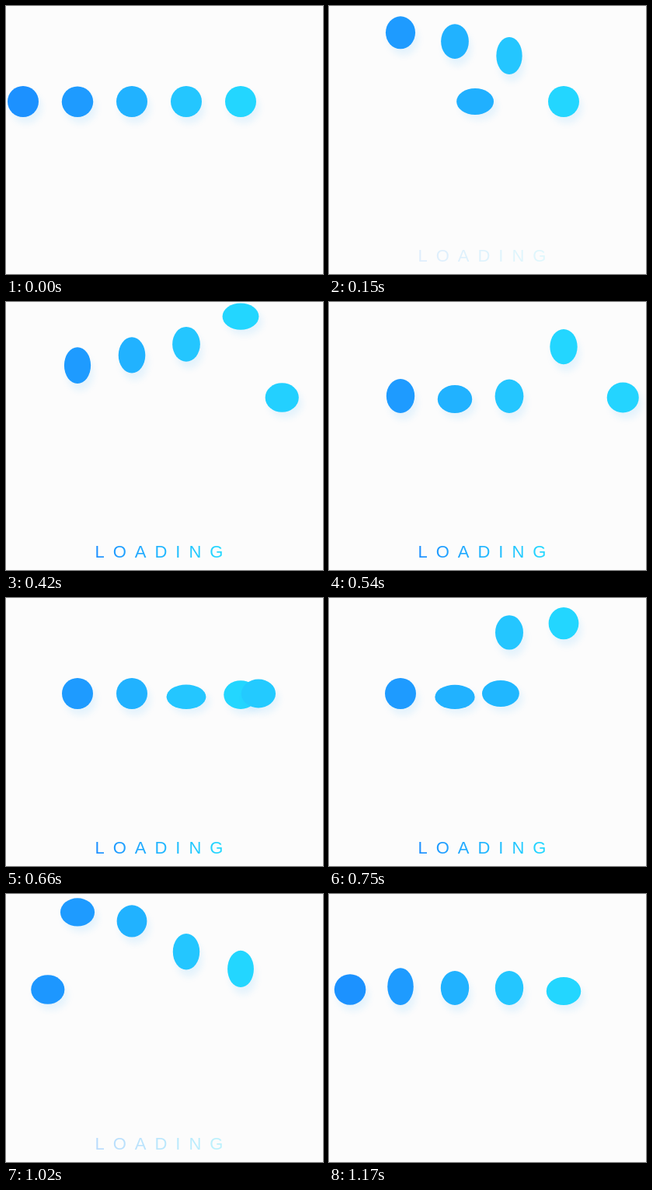
An HTML page for the animation above (1200 ms loop, 408 px wide and 345 px high).

```html
<!DOCTYPE html>
<html lang="en">
<head>
<meta charset="utf-8">
<title>Loading</title>
<style>
  html, body { margin: 0; width: 100%; height: 100%; overflow: hidden; background: #fcfcfc; }
  .ball {
    position: absolute; left: 0; top: 103px; width: 40px; height: 40px;
    border-radius: 50%; transform-origin: 50% 100%;
    box-shadow: 4px 8px 8px rgba(30, 165, 255, .1);
  }
  .slider { transform-origin: 50% 50%; }
  svg { position: absolute; left: 0; top: 0; }
  text { font: 22px "Liberation Sans", Arial, sans-serif; letter-spacing: 11px; }
</style>
</head>
<body>
<svg width="408" height="345">
  <defs>
    <linearGradient id="ink" gradientUnits="userSpaceOnUse" x1="115" y1="0" x2="282" y2="0">
      <stop offset="0" stop-color="#1e90ff"/>
      <stop offset="1" stop-color="#24daff"/>
    </linearGradient>
  </defs>
  <text id="label" x="114.4" y="329" fill="url(#ink)" opacity="0">LOADING</text>
</svg>
<script>
const LOOP = 1200, HALF = 600, HEIGHT = 110, APEX = 0.41;

// Piecewise linear lookup in [[x, y], ...]
function at(table, x) {
  if (x <= table[0][0]) return table[0][1];
  for (let i = 1; i < table.length; i++) {
    const [x0, y0] = table[i - 1], [x1, y1] = table[i];
    if (x <= x1) return y0 + (y1 - y0) * (x - x0) / (x1 - x0);
  }
  return table[table.length - 1][1];
}

const slide = [[0, 0], [.1, .17], [.25, .455], [.35, .615], [.45, .747], [.55, .83],
               [.67, .9], [.8, .956], [.9, .976], [.95, .986], [1, 1]];
const smear = [[0, 0], [.2, 1.05], [1, 0]];
const fade = [[120, 0], [150, .13], [300, 1], [900, 1], [1070, 0]];

// Vertical scale in each phase of a jump
const crouch = [[-60, 1], [-18, .78], [0, .92]];
const rise = [[0, .92], [.2, 1.2], [.3, 1.2], [.55, 1.05], [.73, .9], [.85, .82], [1, .79]];
const fall = [[0, .79], [.27, .9], [.43, 1.02], [.69, 1.15], [1, 1.2]];
const settle = [[0, 1.2], [30, 1.1], [48, .88], [55, .9], [74, 1.1], [84, 1.13],
                [95, 1.1], [125, .9], [160, 1]];

// Lift-off and landing times, out and back
const jumpers = [
  { x: 92,  color: "rgb(30,155,255)", jumps: [[58, 466], [820, 1168]] },
  { x: 162, color: "rgb(33,178,255)", jumps: [[77, 485], [768, 1140]] },
  { x: 232, color: "rgb(36,198,255)", jumps: [[101, 509], [677, 1075]] },
  { x: 302, color: "rgb(35,214,255)", jumps: [[215, 623], [660, 1045]] }
];

function addBall(name) {
  const el = document.createElement("div");
  el.className = name;
  document.body.append(el);
  return el;
}

for (const j of jumpers) {
  j.el = addBall("ball");
  j.el.style.background = j.color;
}
const slider = addBall("ball slider");
const label = document.getElementById("label");

function place(el, x, lift, sx, sy) {
  el.style.transform = `translate(${x - 20}px, ${-lift}px) scale(${sx}, ${sy})`;
}

function pose(jumps, t) {
  const [up, down] = t < jumps[1][0] - 60 ? jumps[0] : jumps[1];
  if (t < up) return [0, at(crouch, t - up)];
  if (t >= down) return [0, at(settle, t - down)];
  const p = (t - up) / (down - up);
  if (p < APEX) {
    const q = p / APEX;
    return [HEIGHT * (1 - (1 - q) ** 2), at(rise, q)];
  }
  const q = (p - APEX) / (1 - APEX);
  return [HEIGHT * (1 - q * q), at(fall, q)];
}

function draw(t) {
  for (const j of jumpers) {
    const [lift, sy] = pose(j.jumps, t);
    place(j.el, j.x, lift, 1 / sy, sy);
  }
  const p = (t % HALF) / HALF;
  const way = t < HALF ? at(slide, p) : 1 - at(slide, p);
  const k = at(smear, p);
  place(slider, 22 + 365 * way, 0, 1 + .2 * k, 1 - .15 * k);
  slider.style.background = `rgb(${28 + 8 * way}, ${145 + 69 * way}, 255)`;
  label.setAttribute("opacity", at(fade, t));
}

let start;
function tick(now) {
  start ??= now;
  draw((now - start) % LOOP);
  requestAnimationFrame(tick);
}
draw(0);
requestAnimationFrame(tick);
</script>
</body>
</html>
```
